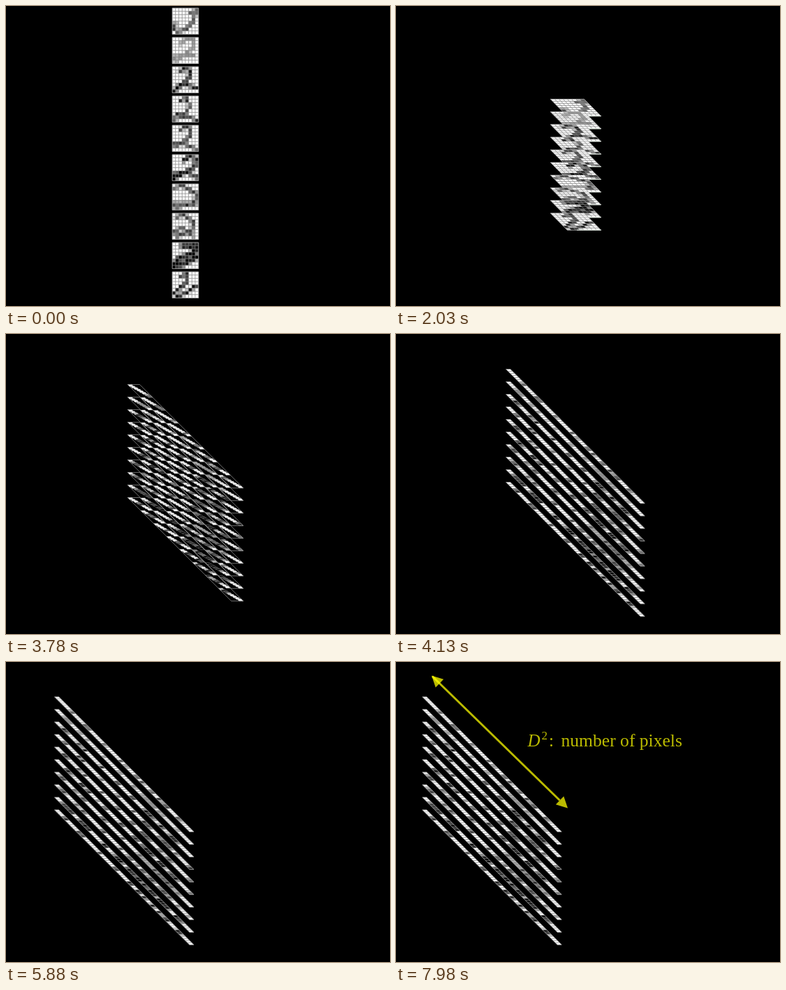
Recreate the animation shown at these times as an HTML page with a canvas. Size 550 by 430 pixels, loop 8000 ms.

```html
<!DOCTYPE html>
<html lang="en">
<head>
<meta charset="utf-8">
<title>From images to pixel vectors</title>
<style>
  html, body { margin: 0; width: 100%; height: 100%; overflow: hidden; background: #000; }
  canvas { display: block; width: 550px; height: 430px; }
</style>
</head>
<body>
<canvas id="stage" width="550" height="430"></canvas>
<script>
const ctx = document.getElementById('stage').getContext('2d');
const LOOP = 8000, STEP = 70, N = 8;
const SERIF = '"Liberation Serif", "Times New Roman", serif';

// Handwritten twos: pen width, ink, then the pen path on an 8 x 8 grid.
const TWOS = [
  [.65, .75, '5.3 1.6 7.3 .8 6.4 4 4.2 6.5 1.6 7.3 .5 6.3 1 4.8'],
  [.65, .45, '2.6 2 4 .7 6.5 .7 6.3 3.4 1 7.3 .6 5.8 6.8 5.7'],
  [.7, .95, '2.3 1.5 3.8 .5 5.5 1.2 5.1 3.6 .6 7.5 2 5.9 4 5.5 7.5 6.5'],
  [.6, .8, '2.6 1.4 4.2 .5 5.4 3 3.6 6.3 .5 7.2 1.3 5.5 3.6 5.8 7.5 7.5'],
  [.65, .75, '2.4 1.5 3.8 .5 5.5 1 5.4 3.4 1 6.7 .6 5.5 4 5.8 7.5 7.4'],
  [.75, .95, '3.5 1.8 5.3 .6 7.2 1.2 7 3.6 .6 7.4 .8 6 4.5 5.4 7.4 7'],
  [.65, .8, '.7 1.3 3 .5 7.3 3 7 5.6 1 7.3 .6 6 7 6.2'],
  [.65, .75, '1.2 1.2 3.4 .5 6.4 2.6 6 5.4 1.4 7.2 .6 5.6 3 4.5 6.2 7'],
  [1.05, 1.1, '3.3 1 7.3 1 6.6 3.3 2 5 .5 7.3 3.6 6.4 7 4.5'],
  [.65, .9, '2.8 1.4 4.2 .5 4.4 3.2 .5 6.6 1.6 7.5 4.5 6.3 7.2 4.3']
];

let seed = 7;
const random = () => (seed = (seed * 16807) % 2147483647) / 2147483647;
const lerp = (a, b, p) => a + (b - a) * p;
const mix = (a, b, p) => a.map((v, i) => lerp(v, b[i], p));
const clamp = (v, lo = 0, hi = 1) => Math.min(hi, Math.max(lo, v));

function distance(x, y, [x1, y1], [x2, y2]) {
  const dx = x2 - x1, dy = y2 - y1;
  const t = clamp(((x - x1) * dx + (y - y1) * dy) / (dx * dx + dy * dy));
  return Math.hypot(x - x1 - t * dx, y - y1 - t * dy);
}

function rasterize([width, ink, path]) {
  const v = path.split(' ').map(Number), pts = [], shades = [];
  for (let i = 0; i < v.length; i += 2) pts.push([v[i], v[i + 1]]);
  for (let k = 0; k < N * N; k++) {
    const x = k % N + .5, y = Math.floor(k / N) + .5;
    let d = 9;
    for (let i = 1; i < pts.length; i++) d = Math.min(d, distance(x, y, pts[i - 1], pts[i]));
    const dark = clamp(1.35 - d / width) * ink * (.75 + .35 * random());
    shades.push(Math.round(255 * (1 - clamp(dark))));
  }
  return shades;
}
const tiles = TWOS.map(rasterize);

// Sigmoid easing
const sigmoid = x => 1 / (1 + Math.exp(-x));
function smooth(a) {
  const e = sigmoid(-5);
  return clamp((sigmoid(10 * (clamp(a) - .5)) - e) / (1 - 2 * e));
}

// Grid corner (c, r) of tile i in each layout
const W = 6.04, H = 3.02;
const upright = (i, c, r) => [238.2 + 4.69 * c, 3 + 4.69 * r + 42 * i];
const lying = (i, c, r) => [221.2 + W * c + H * r, 134.4 + H * r + 18 * i];
const strip = (i, c, n) => [157.3 + W * c + H * n, 50 + H * n + 18 * i];

const CORNERS = [[0, 0], [1, 0], [1, 1], [0, 1]];

function trace(pts) {
  ctx.beginPath();
  pts.forEach(([x, y]) => ctx.lineTo(x, y));
  ctx.closePath();
}

function drawTile(i, tilt, unroll) {
  ctx.lineWidth = .5;
  ctx.strokeStyle = '#888';
  tiles[i].forEach((shade, k) => {
    const c = k % N, r = Math.floor(k / N);
    trace(CORNERS.map(([u, v]) => {
      const flat = mix(upright(i, c + u, r + v), lying(i, c + u, r + v), tilt);
      return unroll ? mix(flat, strip(i, u, k + v), unroll) : flat;
    }));
    ctx.fillStyle = `rgb(${shade},${shade},${shade})`;
    ctx.fill();
    ctx.stroke();
  });
  trace(CORNERS.map(([u, v]) => {
    const flat = mix(upright(i, u * N, v * N), lying(i, u * N, v * N), tilt);
    return mix(flat, strip(i, u, v * N * N), unroll);
  }));
  ctx.lineWidth = .6;
  ctx.strokeStyle = '#bbb';
  ctx.stroke();
  if (tilt > 0 && tilt < 1) drawVeil(i, tilt);
}

// Right half of the frame folds down onto the lower edge
function drawVeil(i, p) {
  trace(CORNERS.map(([u, v]) =>
    mix(upright(i, 4 + 4 * u, v * N), lying(i, 2.3 + 5.7 * u, N), p)));
  ctx.fillStyle = `rgba(255,255,255,${p})`;
  ctx.fill();
  ctx.strokeStyle = `rgba(225,235,225,${p})`;
  ctx.stroke();
}

function drawHead([x, y], dir) {
  const ux = .716 * dir, uy = .698 * dir, len = 16, half = 8.2;
  const bx = x + ux * len, by = y + uy * len;
  trace([[x, y], [bx - uy * half, by + ux * half], [bx + uy * half, by - ux * half]]);
  ctx.fill();
}

function drawLabel(opacity) {
  ctx.save();
  ctx.globalAlpha = opacity;
  ctx.fillStyle = ctx.strokeStyle = '#ff0';
  ctx.lineWidth = 3;
  ctx.beginPath();
  ctx.moveTo(52, 20.5);
  ctx.lineTo(234.5, 198.3);
  ctx.stroke();
  drawHead([51, 19.5], 1);
  drawHead([246, 209.5], -1);
  const write = (text, x, y, size, style = '') => {
    ctx.font = `${style} ${size}px ${SERIF}`;
    ctx.fillText(text, x, y);
  };
  write('D', 188.5, 120.5, 25, 'italic');
  write('2', 208.5, 111, 17);
  write(':', 219, 120.5, 25);
  write('number of pixels', 236.5, 120.5, 25.6);
  ctx.restore();
}

function draw(ms) {
  const n = Math.floor((ms % LOOP) / STEP + 1e-6);
  const phase = start => smooth((n - start) / 15);
  const tilt = phase(15), unroll = phase(45), slide = phase(75), fade = phase(105);
  ctx.fillStyle = '#000';
  ctx.fillRect(0, 0, 550, 430);
  ctx.save();
  ctx.translate(-119.5 * slide, 0);
  for (let i = 0; i < tiles.length; i++) drawTile(i, tilt, unroll);
  ctx.restore();
  if (fade > 0) drawLabel(fade);
}

const begin = performance.now();
function tick() {
  draw(performance.now() - begin);
  requestAnimationFrame(tick);
}
tick();
</script>
</body>
</html>
```
